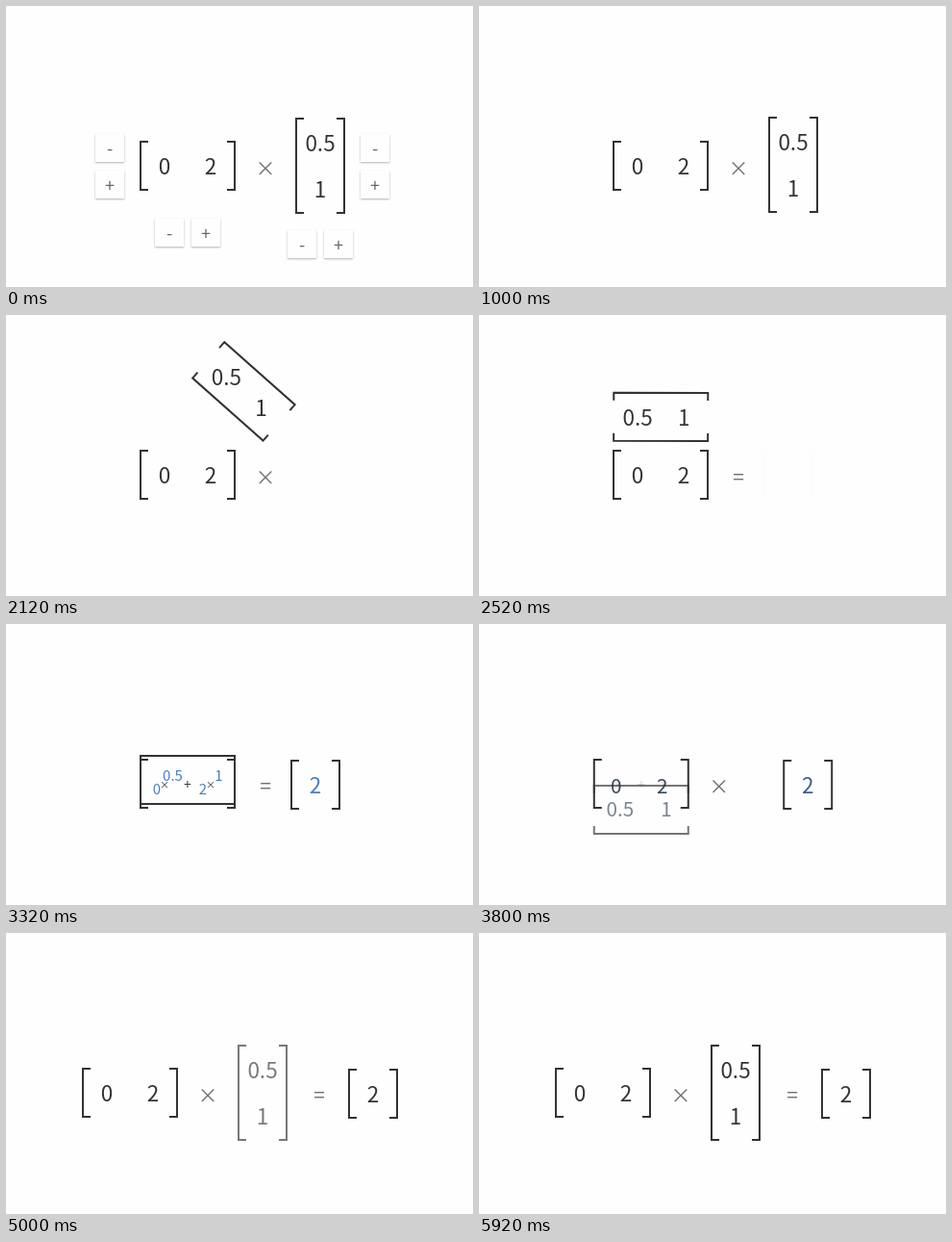
Write an HTML page with a canvas that moves like this. It is 486 px wide and 292 px high and loops after 7.6 s.

```html
<!DOCTYPE html>
<html lang="en">
<head>
<meta charset="utf-8">
<style>
  html, body { margin: 0; width: 100%; height: 100%; overflow: hidden; background: #fefefe; }
  canvas { display: block; }
</style>
</head>
<body>
<canvas id="stage" width="486" height="292"></canvas>
<script>
const ctx = document.getElementById('stage').getContext('2d');
const LOOP = 7600;
const FONT = '"Noto Sans CJK JP", "Noto Sans CJK SC", "Noto Sans CJK", "Noto Sans", sans-serif';
const INK = [51, 51, 51], BLUE = [66, 129, 196], GRAY = [115, 115, 115];
const SIZE = 22.5;

const lerp = (a, b, p) => a + (b - a) * p;
const linear = (t, from, to) => Math.min(1, Math.max(0, (t - from) / (to - from)));
const ease = (t, from, to) => (1 - Math.cos(Math.PI * linear(t, from, to))) / 2;
const mix = (a, b, p) => `rgb(${a.map((v, i) => Math.round(lerp(v, b[i], p)))})`;

function faded(alpha, draw) {
  if (alpha <= 0.004) return;
  ctx.save();
  ctx.globalAlpha *= alpha;
  draw();
  ctx.restore();
}

function label(text, x, y, size = SIZE, color = mix(INK, INK, 0)) {
  ctx.font = `${size}px ${FONT}`;
  ctx.fillStyle = color;
  ctx.fillText(text, x, y + size * 0.366);
}

// Brackets of a w × h matrix centred on (x, y).
function brackets(x, y, w, h, angle = 0) {
  ctx.save();
  ctx.translate(x, y);
  ctx.rotate(angle);
  ctx.strokeStyle = mix(INK, INK, 0);
  ctx.lineWidth = 2;
  ctx.beginPath();
  for (const side of [-1, 1]) {
    const edge = side * (w / 2 - 1), tip = side * (w / 2 - 9), end = h / 2 - 1;
    ctx.moveTo(tip, -end);
    ctx.lineTo(edge, -end);
    ctx.lineTo(edge, end);
    ctx.lineTo(tip, end);
  }
  ctx.stroke();
  ctx.restore();
}

function button(x, y, sign) {
  ctx.save();
  ctx.shadowColor = 'rgba(0,0,0,.3)';
  ctx.shadowBlur = 2;
  ctx.shadowOffsetY = 1;
  ctx.fillStyle = '#fefefe';
  ctx.fillRect(x, y, 30, 29);
  ctx.restore();
  label(sign, x + 15, y + 15, 18, '#666');
}

function buttons() {
  for (const x of [93, 369]) {
    button(x, 133, '-');
    button(x, 171, '+');
  }
  for (const [x, y] of [[155, 221], [293, 233]]) {
    button(x, y, '-');
    button(x + 38, y, '+');
  }
}

// The right-hand factor: lifts, tips over its lower left corner, drops onto the row, leaves.
function operand(t, morph, leave) {
  const lift = ease(t, 956, 1582), turn = ease(t, 1652, 2546), drop = ease(t, 2930, 3400);
  const angle = turn * Math.PI / 2, c = Math.cos(angle), s = Math.sin(angle);
  const cornerX = lerp(301, 239, turn) - 60 * leave;
  const cornerY = 216 - 84 * lift + 60 * drop + 80 * leave;
  const x = cornerX + 26 * c - 50 * s, y = cornerY - 26 * s - 50 * c;
  brackets(x, y, 52, 100, -angle);
  ['0.5', '1'].forEach((text, i) => {
    const d = i ? 24 : -24;
    label(text, x + d * s + 8.5 * morph, y + d * c + 1 - 5.5 * morph,
      lerp(SIZE, 15, morph), mix(INK, BLUE, morph));
  });
}

function leftMatrix(x, morph) {
  brackets(x, 166, 100, 52);
  ['0', '2'].forEach((text, i) => {
    label(text, x + (i ? 24 : -24) - 8 * morph, 167 + 5 * morph,
      lerp(SIZE, 15, morph), mix(INK, BLUE, morph));
  });
  faded(morph, () => {
    label('×', x - 24, 167, 10);
    label('×', x + 24, 167, 10);
    label('+', x, 167, 14);
  });
}

function draw(t) {
  ctx.fillStyle = '#fefefe';
  ctx.fillRect(0, 0, 486, 292);
  ctx.textAlign = 'center';

  const leave = ease(t, 3525, 4225);
  const morph = ease(t, 2950, 3300) - ease(t, 3500, 3950);
  const equals = linear(t, 2380, 2510), apart = linear(t, 3450, 3750);
  const gray = mix(GRAY, GRAY, 0);

  faded(1 - linear(t, 760, 1000), buttons);
  leftMatrix(189 - 60 * leave, morph);
  faded(1 - leave, () => operand(t, morph, leave));

  const signX = 270 - 60 * leave;
  faded(1 - equals + apart, () => label('×', signX, 168, 21, gray));
  faded(equals - apart, () => label('=', signX, 168, 21, gray));
  faded(linear(t, 4000, 4600), () => label('=', 326, 168, 21, gray));

  faded(ease(t, 2480, 3150), () => {
    const x = 322 + 60 * leave;
    brackets(x, 167, 52, 52);
    label('2', x, 168, SIZE, mix(BLUE, INK, linear(t, 3550, 4150)));
  });

  faded(ease(t, 4400, 5400), () => {
    brackets(267, 166, 52, 100);
    label('0.5', 267, 143);
    label('1', 267, 191);
  });
}

function tick(now) {
  draw(now % LOOP);
  requestAnimationFrame(tick);
}
requestAnimationFrame(tick);
</script>
</body>
</html>
```
